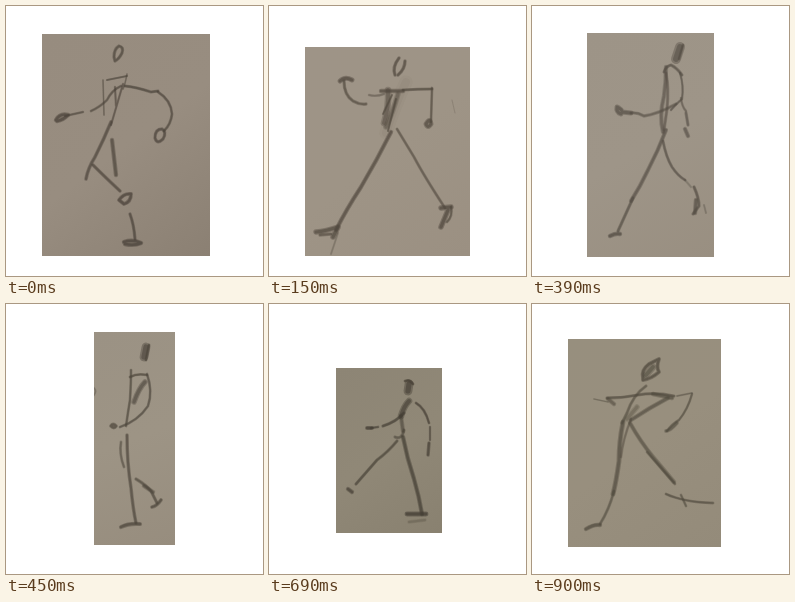
These frames come from a looping animation (257x270 px, 1.05 s). An HTML page with a canvas:

```html
<!DOCTYPE html>
<html lang="en">
<head>
<meta charset="utf-8">
<title>Pencil walk cycle</title>
<style>
html, body { margin: 0; width: 100%; height: 100%; overflow: hidden; background: #fff; }
canvas { display: block; width: 257px; height: 270px; }
</style>
</head>
<body>
<canvas width="257" height="270"></canvas>
<script>
const ctx = document.querySelector('canvas').getContext('2d');
const HOLD = 150;

// box: left, top, right, bottom. paper: top-left, middle, bottom-right colours.
// marks: [line width, opacity, path]
const poses = [
  { box: [36, 28, 204, 250], paper: ['#978c7f', '#988d80', '#8b8073'], ink: '#4b433a', marks: [
    [3, .8, 'M108 51 Q108 43 113 40 Q118 41 116 47 Q113 53 109 55 Z'],
    [2, .75, 'M101 74 L121 70'],
    [1.6, .6, 'M97 74 L98 109 M121 68 Q119 79 117 83'],
    [2.5, .75, 'M115 80 Q106 84 101 94 Q94 101 85 105'],
    [2.2, .75, 'M77 106 L59 110'],
    [4, .9, 'M50 114 Q54 107 62 109 Q57 114 51 115 Z'],
    [2.8, .85, 'M119 80 Q130 81 145 86 L152 85'],
    [2.6, .8, 'M152 86 Q165 94 166 108 Q165 118 158 125'],
    [3, .85, 'M149 132 Q149 123 156 123 Q161 126 157 133 Q151 139 149 132 Z'],
    [2.2, .7, 'M117 78 L105 119 M109 81 L110 100'],
    [3.4, .8, 'M105 116 Q98 133 89 151 Q82 162 80 173'],
    [4, .8, 'M106 134 L110 169'],
    [3.2, .8, 'M87 159 Q99 171 114 185'],
    [3.5, .9, 'M113 194 Q118 187 125 188 Q125 196 118 198 Z'],
    [3, .85, 'M124 208 Q128 219 129 233'],
    [4, .95, 'M118 236 Q127 233 135 237 Q128 240 119 238']
  ] },
  { box: [36, 41, 201, 250], paper: ['#9e9487', '#9e9486', '#9b9082'], ink: '#50483e', marks: [
    [12, .08, 'M137 76 Q125 101 117 127'],
    [3.2, .85, 'M126 69 Q123 61 130 52 M129 69 Q136 63 136 55'],
    [4.5, .9, 'M71 75 Q76 70 83 74'],
    [3, .8, 'M75 75 Q75 89 84 95 Q91 99 97 98'],
    [2.2, .5, 'M100 89 Q107 91 115 88'],
    [4, .85, 'M112 85 L134 85'],
    [2.8, .85, 'M134 84 Q149 83 163 83'],
    [2.5, .8, 'M163 82 L162 116'],
    [4.5, .85, 'M157 118 Q161 111 162 118 Q159 123 157 118 Z'],
    [6, .65, 'M119 84 Q120 101 115 117'],
    [5, .55, 'M129 88 Q124 106 117 121'],
    [2, .8, 'M123 89 L114 108 M127 93 L119 125'],
    [4, .85, 'M122 126 Q108 154 92 181 Q77 204 67 224'],
    [5, .85, 'M47 226 Q57 225 69 221 M64 231 L69 221'],
    [3, .75, 'M51 229 L62 228'],
    [2, .35, 'M69 227 L62 248'],
    [2.8, .7, 'M128 123 L145 151 Q155 170 176 202'],
    [5, .9, 'M172 202 L182 201 M179 204 L172 221'],
    [2.5, .8, 'M182 201 Q184 210 178 216'],
    [1, .25, 'M183 94 L186 107']
  ] },
  { box: [55, 27, 182, 251], paper: ['#9d9487', '#9e9588', '#998f81'], ink: '#554e45', marks: [
    [9, .82, 'M148 41 L144 53'],
    [2.5, .85, 'M151 39 L147 53'],
    [2.8, .85, 'M132 66 Q134 60 139 59 Q145 62 150 69'],
    [4, .7, 'M134 61 Q134 76 132 90 Q127 110 131 126'],
    [3, .7, 'M134 67 Q137 82 135 103 L132 124'],
    [2.2, .8, 'M148 67 Q152 80 150 93 Q144 98 139 104'],
    [3, .75, 'M144 98 Q126 108 112 110 Q105 106 99 107'],
    [4.5, .85, 'M87 102 Q92 105 89 108 Q84 106 85 101 Z M90 106 L99 107'],
    [2.3, .65, 'M149 92 Q150 101 154 105'],
    [3, .75, 'M154 107 L156 119'],
    [4, .75, 'M153 123 L156 130'],
    [3.8, .8, 'M134 124 Q126 145 116 164 Q108 181 99 195'],
    [3, .82, 'M101 192 L86 225'],
    [4, .95, 'M78 230 Q84 227 88 228'],
    [2.8, .8, 'M131 135 Q134 151 140 161 Q146 170 153 174'],
    [2.3, .35, 'M153 174 L159 181'],
    [3, .85, 'M162 181 Q167 192 167 200 L161 208'],
    [4, .85, 'M164 194 L163 207'],
    [2, .4, 'M172 199 L174 207']
  ] },
  { box: [88, 28, 169, 241], paper: ['#9b9284', '#9d9485', '#978d7e'], ink: '#4d463c', marks: [
    [8, .86, 'M140 43 L138 53'],
    [2.6, .9, 'M143 41 L140 56'],
    [2.5, .8, 'M125 66 Q125 79 124 96 Q122 108 120 122'],
    [2.5, .85, 'M124 73 Q131 69 141 71'],
    [5, .75, 'M139 78 Q133 84 128 98'],
    [2.5, .8, 'M141 70 Q147 87 142 102 Q132 117 114 123'],
    [3.5, .85, 'M105 122 Q107 119 110 122 Q108 125 105 122 Z'],
    [2.6, .65, 'M115 138 Q113 150 118 163'],
    [3.2, .82, 'M121 131 Q121 159 125 184 Q127 205 130 219'],
    [3.8, .9, 'M115 223 Q123 219 134 220'],
    [3, .8, 'M130 175 Q140 181 145 187 L151 199'],
    [4, .7, 'M138 182 L147 188'],
    [3.4, .9, 'M146 203 Q151 202 155 196'],
    [2, .4, 'M88 84 Q91 87 88 91']
  ] },
  { box: [67, 64, 173, 229], paper: ['#8d8575', '#908877', '#898170'], ink: '#443e34', marks: [
    [8, .85, 'M140 80 L139 87'],
    [2.6, .9, 'M136 77 Q141 75 144 80'],
    [6, .8, 'M140 97 Q135 102 132 112'],
    [4, .6, 'M132 112 Q133 120 134 127'],
    [3, .8, 'M135 109 Q127 118 114 122'],
    [2.5, .8, 'M109 123 L102 124'],
    [3.5, .95, 'M98 124 L103 124'],
    [2.5, .85, 'M147 99 Q156 104 160 119'],
    [2.1, .75, 'M161 123 L161 136'],
    [3.2, .85, 'M160 139 L159 151'],
    [3, .6, 'M126 133 Q133 136 135 126'],
    [3, .75, 'M128 137 Q119 148 108 156 L87 180'],
    [3.8, .85, 'M79 185 L83 188'],
    [4, .85, 'M134 133 Q138 154 145 175 Q150 192 153 210'],
    [4.5, .95, 'M138 210 Q149 210 157 210'],
    [3, .28, 'M140 218 L156 216']
  ] },
  { box: [23, 33, 216, 246], paper: ['#958d7b', '#968e7c', '#928a77'], ink: '#4c463a', marks: [
    [3.5, .85, 'M130 62 Q130 47 144 42 Q149 48 139 62'],
    [5, .65, 'M136 58 L141 46'],
    [3.2, .8, 'M120 70 Q103 73 96 85'],
    [5, .9, 'M90 89 Q94 93 98 89'],
    [2.5, .85, 'M90 88 L102 86 M95 89 L93 96'],
    [3.2, .9, 'M151 69 Q168 70 183 74'],
    [2.7, .85, 'M182 73 Q188 85 191 103'],
    [1.6, .5, 'M188 87 Q181 97 168 99'],
    [2.2, .65, 'M191 106 Q195 103 196 109 Q192 115 189 109 Z'],
    [4, .8, 'M134 76 Q121 84 118 101 L118 117'],
    [4, .8, 'M146 72 Q142 87 133 99'],
    [5, .6, 'M128 81 Q139 77 146 74'],
    [4, .65, 'M120 104 L126 90'],
    [3.2, .8, 'M115 123 Q98 128 81 138 Q64 146 45 158'],
    [4, .75, 'M92 131 L108 125'],
    [4.5, .8, 'M125 124 L149 168 Q161 187 170 211'],
    [4.5, .85, 'M155 214 Q165 210 176 212'],
    [3, .85, 'M168 207 L171 217'],
    [3, .85, 'M30 152 Q27 157 26 167'],
    [4, .9, 'M23 213 Q28 214 25 219']
  ], scratch: 'M99.5 130 L99.5 156' },
  { box: [36, 35, 189, 243], paper: ['#978f7e', '#988f7e', '#948b7a'], ink: '#504a3e', marks: [
    [3.5, .9, 'M111 74 Q109 66 117 60 L127 55 Q124 63 127 68 Q119 75 111 76 Z'],
    [6, .7, 'M114 71 L121 63'],
    [3, .8, 'M75 94 Q91 94 106 91 Q123 88 142 92'],
    [4, .75, 'M121 90 L140 94'],
    [1.6, .5, 'M62 95 L76 98'],
    [4, .65, 'M76 95 L82 100'],
    [1.8, .6, 'M145 92 L160 89'],
    [2.4, .75, 'M160 90 Q156 105 147 116 Q140 120 135 127'],
    [3.5, .7, 'M145 119 Q138 127 134 127'],
    [3, .7, 'M114 82 Q101 91 95 109 L90 119'],
    [4, .75, 'M136 94 Q117 104 99 116'],
    [5, .45, 'M105 103 L95 115'],
    [4.5, .8, 'M91 118 Q87 138 87 157 Q84 179 81 190'],
    [2.5, .55, 'M99 115 Q91 135 89 153'],
    [2.8, .7, 'M82 187 Q77 206 68 220'],
    [4, .85, 'M54 225 Q62 220 68 221'],
    [4, .7, 'M98 119 Q108 137 121 153 L142 178'],
    [2.5, .7, 'M115 148 L143 180'],
    [2.6, .8, 'M134 190 Q151 198 181 199'],
    [2.5, .7, 'M149 191 L154 202']
  ] }
];

function stroke(path, color, width, alpha) {
  ctx.globalAlpha = alpha;
  ctx.strokeStyle = color;
  ctx.lineWidth = width;
  ctx.stroke(new Path2D(path));
}

function drawPose({ box: [left, top, right, bottom], paper, ink, marks, scratch }) {
  ctx.globalAlpha = 1;
  ctx.fillStyle = '#fff';
  ctx.fillRect(0, 0, 257, 270);
  const shade = ctx.createLinearGradient(left, top, right, bottom);
  paper.forEach((color, i) => shade.addColorStop(i / 2, color));
  ctx.fillStyle = shade;
  ctx.fillRect(left, top, right - left, bottom - top);

  ctx.save();
  ctx.beginPath();
  ctx.rect(left, top, right - left, bottom - top);
  ctx.clip();
  ctx.lineCap = ctx.lineJoin = 'round';
  // A pale edge around a darker core gives the soft pencil line.
  for (const [width, alpha, path] of marks) {
    stroke(path, ink, width * 1.1, alpha * .5);
    stroke(path, ink, width * .65, alpha * .65);
  }
  if (scratch) stroke(scratch, '#c4bdad', 1, .8);
  ctx.restore();
}

let shown = -1;
function tick(now) {
  const index = Math.floor(now / HOLD) % poses.length;
  if (index !== shown) drawPose(poses[shown = index]);
  requestAnimationFrame(tick);
}
tick(performance.now());
</script>
</body>
</html>
```
